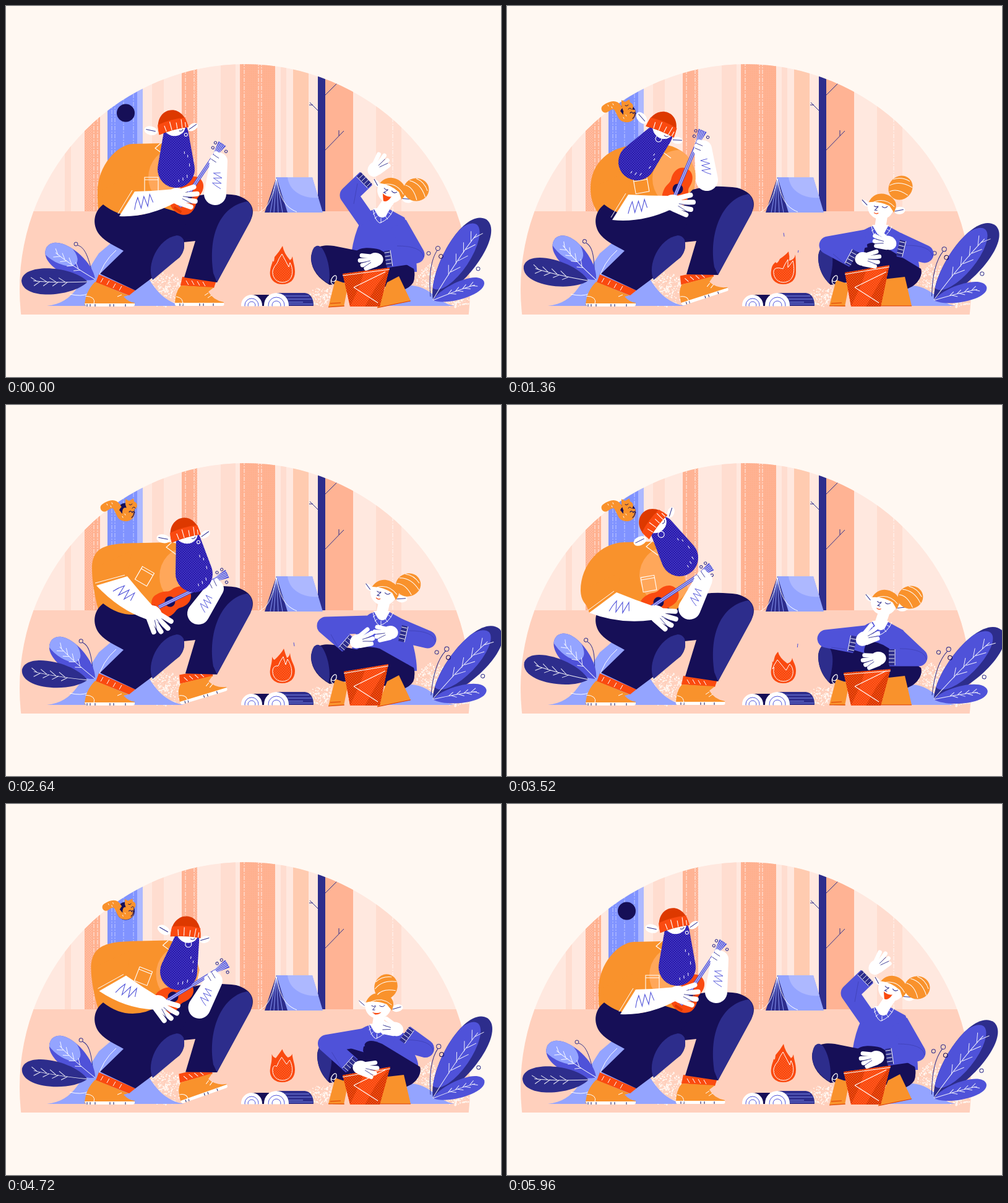
An HTML page with a canvas that plays this animation: 800x600 px, repeating every 6000 ms.

```html
<!DOCTYPE html>
<html lang="en">
<head>
<meta charset="utf-8">
<title>Campfire song</title>
<style>
html, body { margin: 0; width: 100%; height: 100%; overflow: hidden; background: #fff8f2; }
canvas { display: block; width: 800px; height: 600px; }
</style>
</head>
<body>
<canvas id="stage" width="800" height="600"></canvas>
<script>
const LOOP = 6000, STEP = 40;
const KEYS = [0, 1360, 2640, 3520, 4200, 5240, 5960];
const C = {
  paper: '#fff8f2', sky: '#ffe8df', ground: '#ffd0bd', pale: '#ffddd0', peach: '#ffb394',
  navy: '#160f57', dusk: '#2d2d8c', blue: '#4f52d9', sea: '#94a4ff', trunk: '#8093ff', mist: '#adb8ff',
  beard: '#2f1fae', orange: '#f9922c', apricot: '#ffa75a', red: '#fa4a10', brick: '#dd3900', white: '#fff'
};
const { sin, cos, PI, atan2, acos, hypot, min, max } = Math;
const rad = d => d * PI / 180;
const stage = document.getElementById('stage').getContext('2d');
let g = stage;

// drawing helpers
const asPath = p => typeof p === 'string' ? new Path2D(p) : p;
const fill = (p, c) => { g.fillStyle = c; g.fill(asPath(p)); };
const line = (p, c = C.white, w = 1.2) => { g.strokeStyle = c; g.lineWidth = w; g.stroke(asPath(p)); };
const oval = (x, y, rx, ry = rx, a = 0) => {
  const p = new Path2D();
  p.ellipse(x, y, rx, ry, rad(a), 0, 2 * PI);
  return p;
};
const at = (x, y, a, draw, s = 1) => {
  g.save(); g.translate(x, y); g.rotate(rad(a)); g.scale(s, s); draw(); g.restore();
};
const inside = (p, draw) => { g.save(); g.clip(p); draw(); g.restore(); };
function taper(x0, y0, r0, x1, y1, r1) {
  const a = atan2(y1 - y0, x1 - x0), b = acos((r0 - r1) / hypot(x1 - x0, y1 - y0));
  const p = new Path2D();
  p.arc(x0, y0, r0, a + b, a - b + 2 * PI);
  p.arc(x1, y1, r1, a - b, a + b);
  p.closePath();
  return p;
}
function dots(color, step) {
  const c = document.createElement('canvas');
  c.width = c.height = step;
  const k = c.getContext('2d');
  k.fillStyle = color;
  k.fillRect(0, 0, 1, 1);
  k.fillRect(step >> 1, step >> 1, 1, 1);
  return stage.createPattern(c, 'repeat');
}
const grain = {
  white: dots('rgba(255,255,255,.35)', 4), blue: dots('#5a5fe6', 4),
  red: dots('#ff7a45', 4), sand: dots('rgba(255,170,130,.9)', 3)
};

// pose rows sit at KEYS; six rows wrap to the first
function pose(rows, t) {
  let i = 0;
  while (i < 5 && t >= KEYS[i + 1]) i++;
  const u = min(1, (t - KEYS[i]) / (KEYS[i + 1] - KEYS[i]));
  const e = (1 - cos(PI * u)) / 2, b = rows[(i + 1) % rows.length];
  return rows[i].map((v, k) => v + (b[k] - v) * e);
}
// quick wobble that rests on every key
function beat(t, span = 440) {
  let i = 0;
  while (i < 5 && t >= KEYS[i + 1]) i++;
  const d = KEYS[i + 1] - KEYS[i], u = min(1, (t - KEYS[i]) / d);
  return sin(2 * PI * u * Math.round(d / span));
}

// hat x, y, angle, beard x, y, nose x
const HEAD = [
  [271, 200, -15, 275, 264, 17], [248, 202, 22, 210, 252, 2], [291, 214, -16, 304, 273, 17],
  [243, 196, -53, 279, 247, -7], [283, 211, 26, 248, 263, -7], [298, 216, -20, 310, 279, 17]];
// sound hole x, y, angle
const GUITAR = [[292, 308, -56], [276, 296, -67], [265, 318, -26], [245, 319, -34], [277, 305, -43], [263, 319, -20]];
// cuff low, cuff high, wrist
const STRUM = [
  [183, 340, 208, 300, 272, 307], [170, 346, 196, 305, 264, 318], [146, 292, 196, 277, 234, 338],
  [133, 336, 177, 303, 237, 337], [155, 325, 190, 287, 260, 309], [146, 280, 198, 268, 226, 336]];
// fretting hand, elbow
const FRET = [
  [344, 251, 338, 304], [317, 231, 323, 281], [338, 297, 311, 337],
  [318, 283, 295, 329], [334, 268, 319, 316], [338, 304, 306, 342]];
// back x, y, neck x, y, pocket x, y, angle
const TORSO = [
  [148, 300, 250, 222, 235, 289, 0], [135, 295, 255, 224, 217, 290, -10], [139, 265, 268, 222, 224, 277, 30],
  [119, 300, 234, 221, 229, 289, -10], [133, 270, 255, 220, 217, 282, 10], [142, 262, 270, 221, 227, 275, 32]];
const FOOT = [[0], [18], [17], [0], [17], [22]];

// neck, then elbow / cuff / hand on each side
const WOMAN = [
  [606, 329, 554, 306, 582, 279, 596, 264, 662, 402, 614, 409, 597, 410],
  [602, 356, 519, 387, 560, 409, 575, 409, 675, 401, 633, 391, 617, 383],
  [606, 335, 517, 357, 553, 388, 568, 382, 681, 379, 638, 369, 621, 368],
  [602, 351, 516, 378, 562, 387, 576, 378, 665, 408, 618, 408, 600, 410],
  [599, 356, 518, 387, 555, 424, 571, 428, 676, 397, 645, 369, 631, 361],
  [600, 359, 519, 388, 563, 423, 575, 424, 679, 394, 644, 374, 629, 367]];
// face x, y, tilt, bun x, y, smile
const FACE = [
  [621, 299, 20, 663, 297, 1], [604, 325, 5, 636, 294, .1], [610, 304, 12, 650, 291, .1],
  [609, 320, 9, 652, 311, .1], [601, 325, 0, 619, 294, .3], [602, 329, 0, 609, 297, .3]];
const KNEES = [[0], [1], [0], [1], [1], [1]];
const BUCKET = [
  [544, 433, 620, 423], [546, 431, 618, 419], [546, 431, 618, 419],
  [544, 433, 620, 427], [545, 440, 621, 424], [543, 437, 621, 426]];
// left tip, left dip, peak, right dip, right tip
const FIRE = [
  [431, 412, 434, 406, 447, 388, 459, 411, 463, 405], [434, 414, 441, 409, 455, 397, 456, 412, 466, 402],
  [430, 407, 434, 412, 449, 394, 454, 409, 459, 401], [428, 414, 432, 410, 438, 399, 453, 418, 461, 409],
  [429, 406, 435, 411, 446, 393, 456, 409, 462, 404], [430, 403, 437, 411, 447, 400, 455, 411, 463, 404]];
const LEFT_SWAY = [[0], [12], [8], [14], [9], [7]];
const RIGHT_SWAY = [[0], [6], [10], [11], [.3], [1.5], [4.8]];
// squirrel size, head shift
const SQUIRREL = [[1, -4], [1, 4], [1, -4], [1, 3], [.85, 3]];

let seed = 7;
const rnd = () => (seed = seed * 16807 % 2147483647) / 2147483647;
function speckle(x, y, rx, ry, n) {
  g.fillStyle = C.paper;
  for (let i = 0; i < n; i++) {
    const a = rnd() * 2 * PI, d = rnd() ** .7, s = .8 + rnd() * 1.5;
    g.fillRect(x + cos(a) * d * rx, y + sin(a) * d * ry, s, s);
  }
}

function forest() {
  const bar = (x0, x1, c) => { g.fillStyle = c; g.fillRect(x0, 90, x1 - x0, 243); };
  const dash = (x, c = 'rgba(255,255,255,.75)') => {
    g.setLineDash([7, 2, 2, 2]); line(`M${x} 90V333`, c, 1); g.setLineDash([]);
  };
  bar(0, 800, C.sky);
  [[95, 105], [236, 255], [347, 371], [444, 453], [598, 607], [607, 625], [625, 639]]
    .forEach(([a, b]) => bar(a, b, C.pale));
  [[127, 152], [284, 309], [378, 435], [516, 561]].forEach(([a, b]) => bar(a, b, C.peach));
  bar(464, 489, '#ffcbb0');
  bar(127, 139, grain.white); bar(139, 152, grain.sand);
  bar(303, 309, grain.white); bar(380, 407, grain.sand); bar(414, 435, grain.sand);
  [142, 148, 290, 304, 385, 408, 413, 625].forEach(x => dash(x));
  bar(164, 212, C.trunk); bar(212, 221, C.mist);
  [171, 176, 190, 206].forEach(x => dash(x, 'rgba(255,255,255,.5)'));
  bar(504, 516, C.dusk);
  line('M516 233L546 202M538 210V201M516 144L535 125M504 169L491 156M496 160L490 160', C.dusk, 1);
  fill(oval(193.5, 173, 14.5), C.navy);
}

function tent() {
  fill('M437 277H495L512 334H453Z', C.sea);
  fill('M455 277C458 300 480 312 505 310L495 277Z', C.mist);
  fill('M437 277L418 334H455Z', C.dusk);
  line('M437 279L427 334M437 279L433 334M437 279L440 334M437 279L447 334', C.sea, .9);
  line('M437 279C430 312 424 326 410 333M437 279C443 310 450 325 470 333', C.white, 1);
}

function logs() {
  fill('M397 467H425V485H397Z', C.navy);
  fill('M437 464H483Q497 466 497 485H437Z', C.dusk);
  line('M450 469H490M455 474H494M457 479H480M457 482H496', C.sea, .8);
  g.save();
  g.beginPath(); g.rect(370, 455, 135, 30.5); g.clip();
  [[397, 484, 17], [437, 484, 20]].forEach(([x, y, r]) => {
    fill(oval(x, y, r), C.white);
    [.65, .35].forEach(k => line(oval(x, y, r * k), C.blue, 1));
  });
  g.restore();
}

function paintScene() {
  g.fillStyle = C.paper; g.fillRect(0, 0, 800, 600);
  g.save();
  g.beginPath(); g.rect(0, 90, 800, 409); g.clip();
  inside(oval(386, 458, 364), () => {
    forest();
    g.fillStyle = C.ground; g.fillRect(0, 332, 800, 170);
    tent();
    speckle(255, 458, 32, 28, 330);
    speckle(512, 470, 30, 16, 170);
    speckle(690, 450, 28, 34, 320);
    speckle(728, 478, 24, 9, 110);
  });
  g.restore();
  fill('M66 485C112 480 120 445 150 400L176 378L200 400L230 440C245 465 262 481 288 485Z', C.sea);
  line('M103 466Q140 475 148 445Q155 415 178 395', C.white, 1);
  fill('M600 485C625 478 636 455 655 452C690 455 695 480 725 485Z', C.sea);
  logs();
}

function leaf(x, y, a, len, w, base, light) {
  at(x, y, a, () => {
    const p = new Path2D(`M0 0C${len * .22} ${-w} ${len * .98} ${-w * 1.3} ${len} 0C${len * .98} ${w * 1.2} ${len * .22} ${w} 0 0Z`);
    fill(p, base);
    if (light) inside(p, () => fill(oval(len * light[0], w * light[1], len * .4, w * .72), light[2]));
    let d = `M0 0Q${len * .5} ${-w * .12} ${len * .82} 0`;
    for (let k = .3; k < .75; k += .14)
      d += `M${len * k} -1l${len * .09} ${-w * .28}M${len * (k + .04)} -1l${len * .1} ${w * .26}`;
    line(d, 'rgba(255,255,255,.9)', 1);
  });
}

function plants(t) {
  at(140, 442, pose(LEFT_SWAY, t)[0], () => {
    line('M-2 -15C-8 -40 -14 -52 -24 -55', C.dusk, 1);
    fill(oval(-27, -57, 3), C.ground); line(oval(-27, -57, 3), C.dusk, 1);
    leaf(4, 0, 214, 94, 25, C.blue, [.82, .2, C.sea]);
    leaf(-8, 4, 181, 107, 25, C.dusk);
  });
  at(690, 475, pose(RIGHT_SWAY, t)[0], () => {
    line('M-4 -5C-7 -40 -3 -65 7 -80', C.dusk, 1);
    [[8, -83, 3.6], [-7, -75, 3], [73, -50, 3]].forEach(([x, y, r]) => line(oval(x, y, r), C.dusk, 1));
    leaf(0, 0, -56.3, 156, 33, C.dusk, [.5, -.28, C.blue]);
    line(oval(13, -70, 3.4), C.navy, 1);
    leaf(0, 1, -20, 88, 17, C.blue);
  });
}

function squirrel(t) {
  const grow = max(0, min(1, (t - 200) / 400, (5560 - t) / 300));
  if (!grow) return;
  const [size, shift] = pose([[1, 0], ...SQUIRREL], t);
  at(193, 176, 0, () => {
    g.lineCap = 'round';
    line('M-7 2C-13 -8 -14 -24 -34 -10', C.orange, 13);
    fill('M-15 -3C-6 -2 -6 -10 0 -10L14 -8C17 4 11 12 0 12C-11 11 -13 6 -15 -3Z', C.orange);
    fill('M-10 -6Q-6 -14 1 -14Q-6 -8 -5 0Z', C.navy);
    at(5 + shift, -14, 0, () => {
      fill('M-9 -1L-9 -10L-3 -7L4 -11L5 -6Q12 -3 9 4Q4 10 -6 8Z', C.orange);
      line('M-3 -1q3 2 5 -1M2 5q3 -4 5 0', C.navy, 1);
    });
    line('M6 -3q3 -3 5 1q2 -4 4 0M10 6q4 -3 4 -10', C.navy, 1.2);
    line('M-30 -16l1 2M-24 -13l1 2M-22 -18l1 2M-5 4l1 2M-1 0l1 2', C.white, 1);
    g.lineCap = 'butt';
  }, grow * size);
}

function hand(x, y, a, r, len, spread = 22) {
  at(x, y, a, () => {
    fill(oval(0, 0, r * 1.15, r), C.white);
    g.lineCap = 'round';
    for (let i = -1; i <= 2; i++) {
      const q = rad(i * spread), l = len - Math.abs(i) * 2;
      line(`M0 ${i * r * .4}L${cos(q) * l} ${sin(q) * l}`, C.white, r * .62);
    }
    for (let i = 0; i <= 1; i++) {
      const q = rad(i * spread + spread / 2);
      line(`M${cos(q) * r * .8} ${sin(q) * r * .8}L${cos(q) * len * .85} ${sin(q) * len * .85}`, C.dusk, .8);
    }
    g.lineCap = 'butt';
  });
}

const scribble = (x, y, a, s = 1) =>
  at(x, y, a, () => line('M-18 10Q-14 0 -8 -8L-7 10L2 -7L4 10L12 -8L14 6', C.blue, 1.1), s);

function boot() {
  fill('M10 -30L63 -27L54 -20Q62 -6 79 -3L79 2L0 2Q0 -20 10 -30Z', C.orange);
  fill('M0 -2H79Q81 3 76 3H3Q-1 3 0 -2Z', C.white);
  line('M8 -1V3M13 -1V3M40 -1V3M46 -1V3M62 -1V3', C.navy, 1);
  line('M2 -12Q15 -10 12 2M48 -14l6 -4M53 -10l6 -4', C.white, 1);
}

function man(t) {
  const [bx, by, nx, ny, px, py, pa] = pose(TORSO, t);
  const [ax, ay, cx, cy, wx0, wy0] = pose(STRUM, t);
  const [hx, hy, ex, ey] = pose(FRET, t);
  const lift = pose(FOOT, t)[0], k = lift / 18, b = beat(t);
  const wx = wx0 + b * 2, wy = wy0 + b * 5;

  // shirt
  const shirt = new Path2D(`M152 342C150 335 ${bx} ${by + 30} ${bx} ${by}C${bx} ${by - 42} ${bx + 32} ${ny + 2} ${nx - 45} ${ny + 1}L${nx} ${ny}Q${nx + 42} ${ny + 8} ${nx + 50} ${ny + 48}L300 325L240 350Z`);
  fill(shirt, C.orange);
  inside(shirt, () => fill(oval(nx + 22, ny + 55, 42, 46), C.apricot));
  fill(`M${bx} ${by}L${ax} ${ay}L${cx} ${cy}L${bx + 65} ${by - 30}Z`, C.orange);
  at(px, py, pa, () => line('M-11 -12H11V12H-11ZM-11 -8H11', C.white, 1.1));
  line(`M${nx} ${ny}L${nx - 9} ${ny + 8}L${nx + 10} ${ny + 22}`, C.white, 1.1);

  // far boot, trousers
  at(273 + 9 * k, 482, -lift, () => {
    fill('M12 -44L67 -38L63 -26L9 -30Z', C.red);
    line('M18 -38l4 7M27 -38l4 7M36 -37l4 7M45 -36l4 7', C.white, 1);
    boot();
  });
  const knee = 306 - 12 * k;
  fill(`M250 350L300 ${knee + 3}C325 ${knee - 4} 350 ${knee - 3} 372 ${knee}C400 ${knee + 8} 404 ${knee + 26} 394 ${knee + 43}L341 ${447 - 12 * k}L${288 + 2 * k} ${439 - 5 * k}L306 380L230 388Z`, C.navy);
  fill(`M390 ${knee + 10}C345 ${knee + 18} 326 372 335 ${432 - 10 * k}L341 ${447 - 12 * k}L395 ${knee + 42}Q403 ${knee + 20} 390 ${knee + 10}Z`, C.dusk);
  fill('M150 434L209 460L199 468L145 447Z', C.red);
  line('M157 440l-4 7M167 444l-4 7M177 449l-4 7M187 453l-4 7', C.white, 1);
  fill('M157 321C139 335 140 357 152 371C162 382 176 388 190 396L152 433L209 460L280 407C293 393 289 372 278 371L300 340L250 325Q200 355 157 321Z', C.navy);
  fill('M276 371C245 376 226 420 237 443L281 406Q291 393 287 378Q283 371 276 371Z', C.dusk);
  at(128, 482, 0, () => {
    fill('M16 -36L70 -14L62 -12Q70 -3 80 -2L80 2H-1Q0 -20 16 -36Z', C.orange);
    fill('M-1 -1H80Q81 4 76 4H2Z', C.white);
    line('M3 0V4M8 0V4M16 0V4M40 0V4M46 0V4M65 0V4', C.navy, 1);
    line('M0 -13Q18 -12 14 0M52 -12l7 -3', C.white, 1);
  });

  guitar(t);

  // arms
  fill(taper(ex, ey, 18, hx, hy, 14), C.white);
  const fa = atan2(hy - ey, hx - ex) * 180 / PI;
  scribble((ex + hx * .8) / 1.8, (ey + hy * .8) / 1.8, fa, .8);
  at(hx, hy, pose(GUITAR, t)[2], () => {
    g.lineCap = 'round';
    line('M-8 2L-8 -10M0 2V-12M8 2V-11', C.white, 7);
    line('M-4 -3V-12M4 -3V-13', C.dusk, .8);
    g.lineCap = 'butt';
  });
  const dir = atan2(wy - (ay + cy) / 2, wx - (ax + cx) / 2);
  const ox = -sin(dir) * 11, oy = cos(dir) * 11;
  fill(`M${ax} ${ay}Q${(ax + wx) / 2 + ox} ${(ay + wy) / 2 + oy + 8} ${wx + ox} ${wy + oy}L${wx - ox} ${wy - oy}Q${(cx + wx) / 2 - ox * .4} ${(cy + wy) / 2 - oy * .4} ${cx} ${cy}Z`, C.white);
  line(`M${ax - 2} ${ay - 4}L${cx - 4} ${cy - 2}`, C.white, 1);
  scribble((ax + cx + wx * 1.1) / 3.1, (ay + cy + wy * 1.1) / 3.1, dir * 180 / PI - 5);
  hand(wx + 4, wy, dir * 180 / PI + 4, 13, 33);

  manHead(t);
}

function guitar(t) {
  const [x, y, a] = pose(GUITAR, t);
  at(x, y, a, () => {
    fill('M-14 -20C-36 -20 -36 20 -14 21C0 22 2 15 10 16C24 19 36 12 36 0C36 -12 24 -19 10 -16C2 -15 0 -21 -14 -20Z', C.red);
    line('M-26 -7V7', C.brick, 4);
    fill(oval(0, 0, 8.5), C.navy);
    fill('M-20 -3H80L103 -7V7L80 3H-20Z', C.blue);
    line('M-20 -1.2H102M-20 1.2H102M80 -3L103 -4M80 3L103 4', C.white, .8);
    [[98, -10], [89, -9], [96, 12]].forEach(([u, v]) => line(oval(u, v, 2.1), C.dusk, 1));
  });
}

function manHead(t) {
  const [x, y, a, bx, by, nose] = pose(HEAD, t);
  at(x, y, a, () => {
    fill(oval(-36, -8, 11, 7, 28), C.white);
    line('M-43 -12L-29 -5', C.dusk, 1);
    fill(oval(31, 4, 9, 5.5, -18), C.white);
    line('M24 6L38 1', C.dusk, 1);
  });
  const q = rad(a), beard = taper(x + 2 - sin(q) * 7, y + cos(q) * 7, 20, bx, by, 30);
  fill(beard, C.beard);
  fill(beard, grain.blue);
  at(bx, by, atan2(by - y, bx - x) * 180 / PI - 90, () =>
    line('M15 -28v4M20 -22v4M10 14v5M17 10v5M22 -8v5M3 17v4', C.white, 1));
  at(x, y, a, () => {
    fill('M-15 -2Q-8 12 6 11Q18 9 20 -2Z', C.white);
    line('M8 4q4 3 7 -1', C.dusk, 1);
    line(oval(nose, 13, 2.5 + 2.5 * min(1, Math.abs(nose - 17) / 12)), C.white, 1.1);
    fill('M-24 2C-26 -18 -14 -32 0 -32C15 -32 25 -18 24 2Q0 -1 -24 2Z', C.brick);
    fill('M-25 2L-23 -14Q0 -18 23 -14L24 2Q0 -2 -25 2Z', C.red);
    line('M-12 0l-1 -10M-3 0v-14M6 0l1 -10M14 1l2 -14M20 1l1 -8', C.white, 1.1);
  });
}

function fire(t) {
  const f = pose(FIRE, t), w = beat(t, 300) * 2.5;
  const [lx, ly, dx, dy, px, py, ex, ey, rx, ry] = f.map((v, i) => v + (i % 2 ? w : -w * .6));
  const flame = new Path2D(`M446 450C432 450 425 439 427 428C428 420 430 418 ${lx} ${ly}Q${lx + 2} ${ly + 5} ${dx} ${dy}Q${px - 5} ${(py + dy) / 2} ${px} ${py}Q${px + 2} ${(py + ey) / 2} ${ex} ${ey}Q${rx - 1} ${ey - 2} ${rx} ${ry}C${rx + 1} 415 467 420 467 430C467 443 459 450 446 450Z`);
  fill(flame, C.red);
  const core = new Path2D(`M446 447C434 446 430 436 431 428Q433 421 ${px - 9} ${py + 28}L${px - 6} ${py + 21}L${px - 1} ${py + 13}L${ex - 2} ${ey + 11}L${rx - 4} ${ry + 10}C466 428 464 447 446 447Z`);
  fill(core, grain.red);
  line(core, C.white, 1);
  [[905, 447], [1280, 471], [2415, 465], [3320, 470], [5230, 467]].forEach(([start, x], i) => {
    const age = t - start;
    if (age >= 0 && age < 500) line(`M${x} ${401 - age * .075}l${i % 2 ? -.7 : 1} ${1 + min(5, age * .035)}`, C.blue, 1);
  });
}

function sleeve(sx, sy, ex, ey, cx, cy) {
  g.lineJoin = 'round';
  line(`M${sx} ${sy}L${ex} ${ey}L${cx} ${cy}`, C.blue, 29);
  g.lineJoin = 'miter';
  at(cx, cy, atan2(cy - ey, cx - ex) * 180 / PI, () => {
    fill('M-9 -13H1V13H-9Z', C.dusk);
    line('M-9 -13V13M-8 -8H1M-8 -2H1M-8 4H1M-8 10H1', C.white, .9);
  });
}

function woman(t) {
  const [nx, ny, ...arm] = pose(WOMAN, t);
  const m = pose(KNEES, t)[0], r = 1 - m;
  const tap = beat(t) * 1.5;

  // body
  fill(`M${nx - 12} ${ny}Q${nx - 38} ${ny + 8} ${558 - m * 14} 400L575 430H664Q${674 - r * 10} ${ny + 60} ${nx + 38} ${ny + 13}L${nx + 14} ${ny}Z`, C.blue);
  fill(`M${nx - 12} ${ny - 2}L${nx + 15} ${ny - 2}L${nx + 8} ${ny + 11}Q${nx} ${ny + 16} ${nx - 5} ${ny + 10}Z`, C.white);
  line(`M${nx - 13} ${ny}Q${nx - 10} ${ny + 18} ${nx - 2} ${ny + 22}Q${nx + 14} ${ny + 16} ${nx + 20} ${ny}`, C.white, 1);
  line(`M${nx - 9} ${ny + 5}l-4 3M${nx - 6} ${ny + 11}l-4 4M${nx} ${ny + 14}v8M${nx + 7} ${ny + 11}l4 5M${nx + 12} ${ny + 5}l5 3`, C.white, .9);

  // legs
  const kx = 493 + 10 * m;
  fill(`M${kx} 410C${kx - 1} 386 518 384 540 390L590 ${400 + m * 5}L650 420Q672 445 645 458L550 447L523 451Q${kx + 2} 435 ${kx} 410Z`, C.navy);
  fill(`M${kx} 408C${kx + 1} 386 ${kx + 12} 384 ${kx + 18} 392C${kx + 30} 410 ${525 - 4 * m} 440 521 449Q${kx + 1} 432 ${kx} 408Z`, C.dusk);
  fill(`M${563 + m * 14} ${405 - m * 6}C${562 + m * 16} ${390 - m * 10} ${585 + m * 5} ${389 - m * 9} ${604 + m * 4} ${394 - m * 6}L${659 + m * 10} 425C${664 + m * 10} 440 655 461 635 458L590 435Z`, C.navy);

  // shoes
  fill(`M532 443L553 450L546 486L521 ${485 + r * 2}Z`, C.orange);
  line(`M521 ${485 + r * 2}L547 485M524 481L541 480`, C.brick, 1);
  fill(`M${608 + r * 8} ${442 + r * 5}L${643 - r * 8} ${438 - r}L654 ${485 - r * 8}L600 ${485 + r * 3}Z`, C.orange);
  line(`M600 ${485 + r * 3}L654 ${485 - r * 8}`, C.brick, 1);
  line('M529 450C519 447 532 430 534 438C535 446 527 448 525 443', C.white, 1.2);

  // drum
  const [lx, ly, rx, ry] = pose(BUCKET, t);
  const drum = new Path2D(`M${lx} ${ly}L${rx} ${ry}L604 486H556Z`);
  fill(drum, C.red);
  inside(drum, () => {
    fill(`M${lx} ${ly}L${lx + 35} ${ly - 5}L572 452L556 486Z`, C.brick);
    fill(`M${rx} ${ry}L${rx - 12} 486H580L598 454Z`, C.brick);
    fill(drum, grain.red);
  });
  line(`M${lx} ${ly + 3}L${rx} ${ry + 3}M562 455L613 430M562 455L601 480`, C.white, 1.1);

  // arms and head
  const [e1x, e1y, c1x, c1y, h1x, h1y, e2x, e2y, c2x, c2y, h2x, h2y] = arm;
  sleeve(nx - 22, ny + 20, e1x, e1y, c1x, c1y);
  sleeve(nx + 28, ny + 24, e2x, e2y, c2x, c2y);
  line(`M${e1x + 8} ${e1y + 14}L${c1x - 14} ${c1y + 8}M${e2x - 30} ${e2y - 14}Q${e2x + 10} ${e2y - 14} ${e2x + 13} ${e2y + 4}`, 'rgba(45,45,140,.55)', .7);
  womanHead(t, nx, ny);
  const turn = (x0, y0, x1, y1) => atan2(y1 - y0, x1 - x0) * 180 / PI;
  hand(h1x, h1y + tap, turn(c1x, c1y, h1x, h1y) - 8, 11, 27, 20);
  at(h2x, h2y - tap, turn(c2x, c2y, h2x, h2y), () => { g.scale(1, -1); hand(0, 0, 0, 11, 25, 20); });
}

function womanHead(t, nx, ny) {
  const [x, y, a, bx, by, smile] = pose(FACE, t);
  line(`M${x + 3} ${y + 8}L${nx + 1} ${ny + 3}`, C.white, 18);
  at(x, y, a, () => {
    fill(oval(31, 3, 9, 6, -12), C.white);
    fill(oval(-25, -4, 7, 4, 35), C.white);
    line('M23 5L37 1M-31 -9L-22 -1', C.dusk, 1);
    fill(oval(0, 0, 21, 20), C.white);
    fill('M-20 -6C-14 -22 2 -25 15 -18C25 -12 27 -4 22 7L14 -3Q-4 -10 -20 -6Z', C.orange);
    line('M-12 -7Q6 -16 22 -2', C.white, 1);
    line('M-11 -1q4 3 7 0M2 -1q5 4 9 -1M-4 0l-5 6h4', C.dusk, 1);
    if (smile > .2) fill(`M-10 ${10 - smile * 2}Q-2 ${13 - smile} 5 ${10 - smile * 2}Q2 ${11 + 9 * smile} -5 ${11 + 8 * smile}Z`, C.red);
    else line('M-10 10q4 3 7 0', C.red, 1.2);
  });
  at(bx, by, atan2(by - y, bx - x) * 180 / PI, () => {
    fill(oval(0, 0, 20.5, 18.5), C.orange);
    line('M-10 -15Q8 -10 14 13M-17 -8Q-4 -4 0 17M1 -18Q14 -12 18 3', C.white, 1);
  });
}

const backdrop = document.createElement('canvas');
backdrop.width = 800; backdrop.height = 600;
g = backdrop.getContext('2d');
paintScene();
g = stage;

function draw(now) {
  const t = Math.floor(now / STEP) * STEP % LOOP;
  g.drawImage(backdrop, 0, 0);
  squirrel(t);
  plants(t);
  man(t);
  fire(t);
  woman(t);
}
const begin = performance.now();
(function tick() {
  draw(performance.now() - begin);
  requestAnimationFrame(tick);
})();
</script>
</body>
</html>
```
